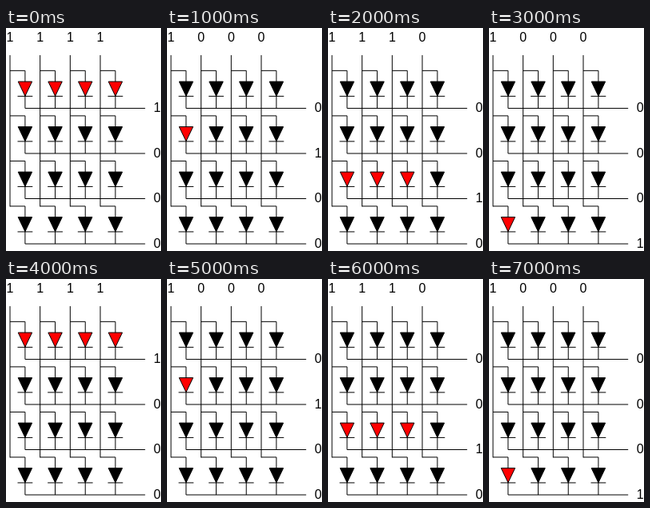
Recreate the animation shown at these times as an HTML page with a canvas. Size 194 by 279 pixels, loop 8000 ms.

```html
<!DOCTYPE html>
<html lang="en">
<head>
<meta charset="utf-8">
<title>LED matrix row scan</title>
<style>
  html, body { margin: 0; width: 100%; height: 100%; overflow: hidden; background: #fff; }
  canvas { display: block; }
</style>
</head>
<body>
<canvas id="stage" width="194" height="279"></canvas>
<script>
const ctx = document.getElementById('stage').getContext('2d');
const STEP = 1000;
const PATTERN = ['1111', '1000', '1110', '1000'];
const DROP = 47.1; // from a diode's tap down to its row wire
const STEM = 18.9; // from a column wire across to its diodes
const columnX = i => 5 + 37.67 * i;
const tapY = i => 53.35 + 56.53 * i;

function line(...points) {
  ctx.beginPath();
  for (let i = 0; i < points.length; i += 2) ctx.lineTo(points[i], points[i + 1]);
  ctx.stroke();
}

function drawDiode(x, y, lit) {
  const cx = x + STEM;
  line(x, y, cx, y, cx, y + DROP);
  line(cx - 9.4, y + 32, cx + 9.4, y + 32);
  ctx.beginPath();
  ctx.moveTo(cx - 8.7, y + 13.7);
  ctx.lineTo(cx + 8.7, y + 13.7);
  ctx.lineTo(cx, y + 31.8);
  ctx.closePath();
  ctx.fillStyle = lit ? '#f00' : '#000';
  ctx.fill();
  ctx.stroke();
}

function label(text, x, y) {
  ctx.fillStyle = '#000';
  ctx.fillText(text, x, y);
}

function draw(activeRow) {
  ctx.fillStyle = '#fff';
  ctx.fillRect(0, 0, 194, 279);
  ctx.strokeStyle = '#000';
  ctx.lineWidth = 1;
  ctx.lineJoin = 'round';
  ctx.font = '16px "Liberation Sans", Arial, sans-serif';
  ctx.textAlign = 'center';

  for (let row = 0; row < 4; row++) {
    const y = tapY(row);
    line(columnX(0) + STEM, y + DROP, 174.2, y + DROP);
    label(row === activeRow ? '1' : '0', 189.3, Math.round(y + DROP + 4.8));
    for (let col = 0; col < 4; col++) {
      drawDiode(columnX(col), y, row === activeRow && PATTERN[row][col] === '1');
    }
  }
  for (let col = 0; col < 4; col++) {
    const x = columnX(col);
    line(x, 34, x, tapY(3) + 0.5);
    label(PATTERN[activeRow][col], x, 17);
  }
}

const start = performance.now();
function tick() {
  draw(Math.floor((performance.now() - start) / STEP) % 4);
  requestAnimationFrame(tick);
}
tick();
</script>
</body>
</html>
```
